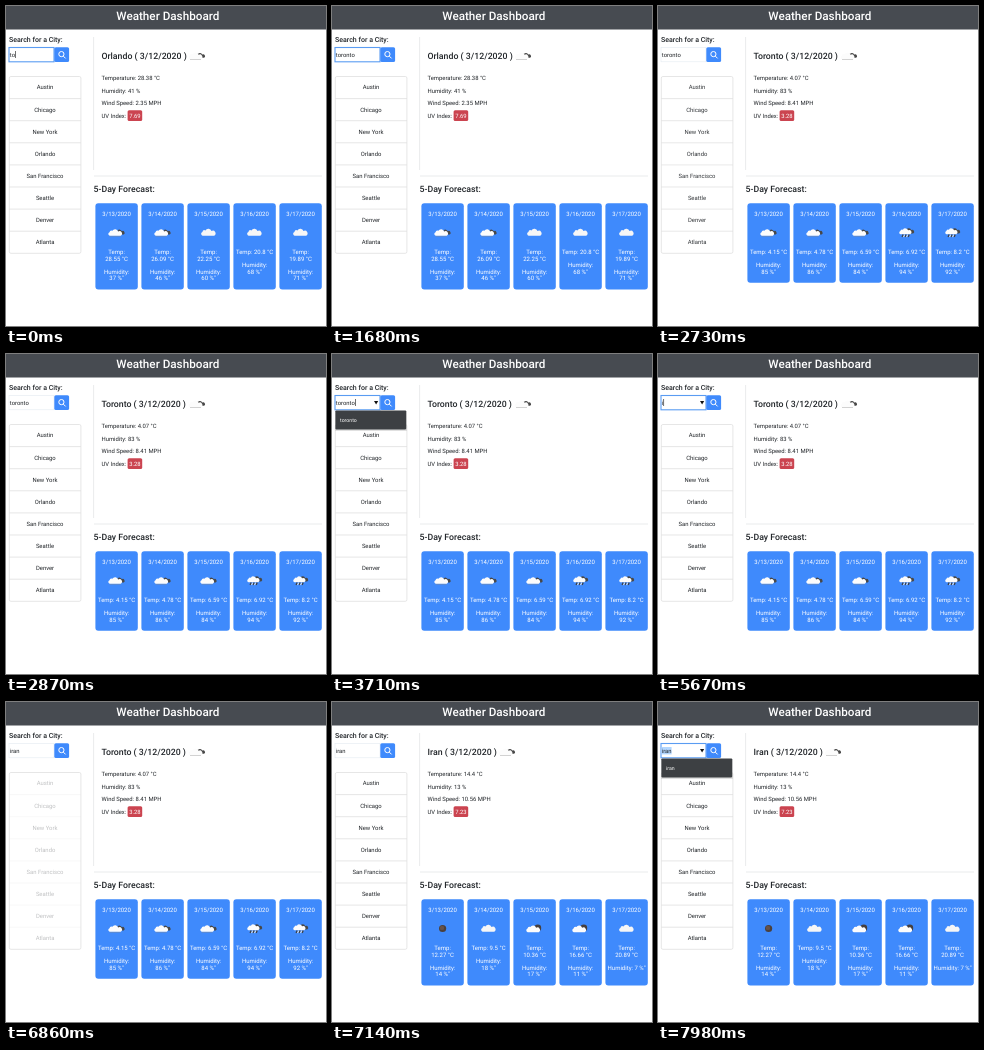
An HTML page for the animation above (8 s loop, 320x320 px).

```html
<!DOCTYPE html>
<html lang="en">
<head>
<meta charset="utf-8">
<title>Weather Dashboard</title>
<style>
html, body { margin: 0; width: 100%; height: 100%; overflow: hidden; background: #fff; }
svg { display: block; width: 100vw; height: 100vh; text-rendering: geometricPrecision; }
text { font: 5.9px Roboto, Arial, sans-serif; fill: #212529; white-space: pre; }
.mid { text-anchor: middle; }
.white, .card text { fill: #fff; }
.card text { font-size: 6px; }
.title { font-size: 11.7px; font-weight: 500; fill: #fff; }
.label { font-size: 7px; font-weight: 500; }
.head { font-size: 8.75px; font-weight: 500; }
</style>
</head>
<body>
<svg viewBox="0 0 320 320">
  <defs>
    <path id="puff" d="M-6 3.2a2 2 0 0 1-.2-3.8a2.2 2.2 0 0 1 3-1.5a3.4 3.4 0 0 1 6.1.7a2.4 2.4 0 0 1 2.7 4.6z"/>
    <g id="cloud"><use href="#puff" fill="#f6f6f6"/></g>
    <g id="broken">
      <use href="#puff" transform="translate(3.2 -.3) scale(.7)" fill="#484848"/>
      <path d="M-7 3.7H4" stroke="#8a8a8a" stroke-width=".5"/>
      <use href="#puff" transform="translate(-1.2 .3) scale(.95)" fill="#fcfcfc"/>
    </g>
    <g id="rain">
      <use href="#puff" transform="translate(2.4 -1.4) scale(.75)" fill="#484848"/>
      <use href="#puff" transform="translate(-1 -1) scale(.85)" fill="#fcfcfc"/>
      <path d="M-3.5 2l-1 2.4M-.5 2l-1 2.4M2.6 2l-1 2.4" stroke="#3d4148" stroke-width="1.3"/>
      <path d="M-2 2.2l-1 2.4M1 2.2l-1 2.4" stroke="#eee" stroke-width="1"/>
    </g>
    <g id="night"><circle r="3.6" fill="#4b403d"/><circle cx="-.6" cy="-.6" r="2.2" fill="#66524a"/></g>
    <g id="few">
      <circle cx="3.2" cy="-.6" r="3.4" fill="#463f3e"/>
      <use href="#puff" transform="translate(-1.2 .6) scale(.95)" fill="#fcfcfc"/>
    </g>
  </defs>

  <rect width="320" height="23.5" fill="#474b51"/>
  <text class="title mid" x="161.8" y="14.3">Weather Dashboard</text>
  <text class="label" x="3" y="35.8">Search for a City:</text>
  <path d="M87.6 31V164M88 170H316" fill="none" stroke="#e4e6e8" stroke-width=".8"/>

  <rect x="3.3" y="70.5" width="71.6" height="176.8" rx="1.6" fill="#fff" stroke="#dcdcdc" stroke-width=".7"/>
  <g id="list"></g>

  <rect id="field" x="3" y="41.5" width="45" height="14.3" fill="#fff"/>
  <rect id="mark" x="3.8" y="45" height="7.4" fill="#b3d7ff"/>
  <text id="typed" x="3.8" y="50.6"></text>
  <rect id="caret" y="45" width=".6" height="7" fill="#111"/>
  <path id="arrow" d="M42 46.9h4.2l-2.1 3.6z" fill="#111"/>
  <rect x="48.3" y="41.2" width="14.8" height="14.8" rx="1.6" fill="#3f8afc"/>
  <g fill="none" stroke="#fff" stroke-width="1"><circle cx="55.4" cy="48.1" r="2.6"/><path d="M57.3 50.1l2.3 2.3"/></g>

  <g id="menu">
    <rect x="3" y="57" width="72" height="20" rx="1" fill="#000" opacity=".12"/>
    <rect x="3.4" y="56.4" width="70.8" height="19" rx=".8" fill="#3d4043"/>
    <text id="option" class="white" x="8" y="67.9" style="font-size:5.2px"></text>
  </g>

  <g id="weather"></g>
  <text class="head" x="87.6" y="185.8">5-Day Forecast:</text>
</svg>
<script>
const LOOP = 8000;
const $ = id => document.getElementById(id);
const show = (id, on) => $(id).setAttribute('visibility', on ? 'visible' : 'hidden');

const cities = ['Austin', 'Chicago', 'New York', 'Orlando', 'San Francisco', 'Seattle', 'Denver', 'Atlanta'];
const reports = [
  { from: 0, city: 'Orlando', icon: 'broken', iconX: 191, now: ['28.38', 41, '2.35', '7.69'],
    temp: ['28.55', '26.09', '22.25', '20.8', '19.89'], hum: [37, 46, 60, 68, 71],
    icons: ['broken', 'broken', 'cloud', 'cloud', 'cloud'] },
  { from: 2730, city: 'Toronto', icon: 'broken', iconX: 191, now: ['4.07', 83, '8.41', '3.28'],
    temp: ['4.15', '4.78', '6.59', '6.92', '8.2'], hum: [85, 86, 84, 94, 92],
    icons: ['broken', 'broken', 'broken', 'rain', 'rain'] },
  { from: 7070, city: 'Iran', icon: 'broken', iconX: 175, now: ['14.4', 13, '10.56', '7.23'],
    temp: ['12.27', '9.5', '10.36', '16.66', '20.89'], hum: [14, 18, 17, 11, 7],
    icons: ['night', 'cloud', 'few', 'few', 'cloud'] }
];

// Each entry: start time, field text
const typing = [
  [0, 'to'], [210, 'tor'], [420, 'toro'], [630, 'toron'], [840, 'toront'], [1050, 'toronto'],
  [4480, ''], [5600, 'i'], [5880, 'ir'], [6090, 'ira'], [6300, 'iran']
];
const searches = [2590, 6810];
const menus = [[3640, 4480], [7910, LOOP]];
const marks = [[3780, 4480], [7975, LOOP]];
const focused = [[0, 2590], [3640, 6810], [7910, LOOP]];
const hovered = [[3640, 6810], [7910, LOOP]];

const within = (spans, t) => spans.find(([a, b]) => t >= a && t < b);
const latest = (steps, t, start) => steps.filter(s => start(s) <= t).pop();
const label = (x, y, s, cls = '') => `<text class="${cls}" x="${x}" y="${y}">${s}</text>`;

const LINE = 6.7;
const wraps = temp => temp.length > 4;

function card(r, i) {
  const x = 89.4 + 46 * i, mid = x + 21.2;
  const height = r.temp.some(wraps) ? 86.2 : 79.5;
  const wrapped = wraps(r.temp[i]);
  const temp = wrapped ? ['Temp:', r.temp[i] + ' °C'] : [`Temp: ${r.temp[i]} °C`];
  const hum = r.hum[i] < 10 ? [`Humidity: ${r.hum[i]} %"`] : ['Humidity:', r.hum[i] + ' %"'];
  const lines = (list, y) => list.map((s, n) => label(mid, y + LINE * n, s, 'mid')).join('');
  return `<g class="card"><rect x="${x}" y="197.3" width="42.4" height="${height}" rx="3" fill="#3f8afc"/>
    ${label(mid, 210.4, `3/${13 + i}/2020`, 'mid')}
    <use href="#${r.icons[i]}" transform="translate(${mid} 226.5)"/>
    ${lines(temp, 248.4)}${lines(hum, 260.9 + (wrapped ? LINE : 0))}</g>`;
}

function weather(r) {
  const [temp, hum, wind, uv] = r.now;
  const rows = [`Temperature: ${temp} °C`, `Humidity: ${hum} %`, `Wind Speed: ${wind} MPH`, 'UV Index:'];
  return label(95.5, 53.3, `${r.city} ( 3/12/2020 )`, 'head') +
    `<use href="#${r.icon}" transform="translate(${r.iconX} 49.8)"/>` +
    rows.map((s, i) => label(95.5, 74.1 + 12.5 * i, s)).join('') +
    '<rect x="121.6" y="104.3" width="14.6" height="10.8" rx="1.5" fill="#cb4450"/>' +
    label(128.9, 111.7, uv, 'mid white') +
    r.temp.map((_, i) => card(r, i)).join('');
}

const ROW = 22.1;
$('list').innerHTML = cities.map((c, i) => {
  const y = 70.5 + ROW * i;
  return (i ? `<path d="M3.3 ${y}h71.6" stroke="#dcdcdc" stroke-width=".7"/>` : '') + label(39, y + 12.9, c, 'mid');
}).join('');

let current, lastText;
let textWidth = 0;

function draw(t) {
  const report = latest(reports, t, r => r.from);
  if (report !== current) $('weather').innerHTML = weather(current = report);

  const [since, text] = latest(typing, t, s => s[0]);
  if (text !== lastText) {
    $('typed').textContent = lastText = text;
    textWidth = text ? $('typed').getComputedTextLength() : 0;
  }

  const focus = within(focused, t), menu = within(menus, t), mark = within(marks, t);
  const field = $('field');
  field.setAttribute('stroke', focus ? '#5a9cf2' : '#e3eaf1');
  field.setAttribute('stroke-width', focus ? 1.1 : .6);

  const blink = focus && Math.floor((t - Math.max(since, focus[0])) / 530) % 2 === 0;
  $('caret').setAttribute('x', 4 + textWidth);
  show('caret', blink && !mark);
  $('mark').setAttribute('width', textWidth);
  show('mark', mark);
  show('arrow', within(hovered, t));
  show('menu', menu);
  $('option').textContent = text;

  // The city list dips and returns after each search
  const fade = Math.max(...searches.map(s => 1 - Math.abs(t - s - 60) / 90), 0);
  $('list').setAttribute('opacity', 1 - .8 * fade);
}

function tick() {
  draw(performance.now() % LOOP);
  requestAnimationFrame(tick);
}
tick();
</script>
</body>
</html>
```
